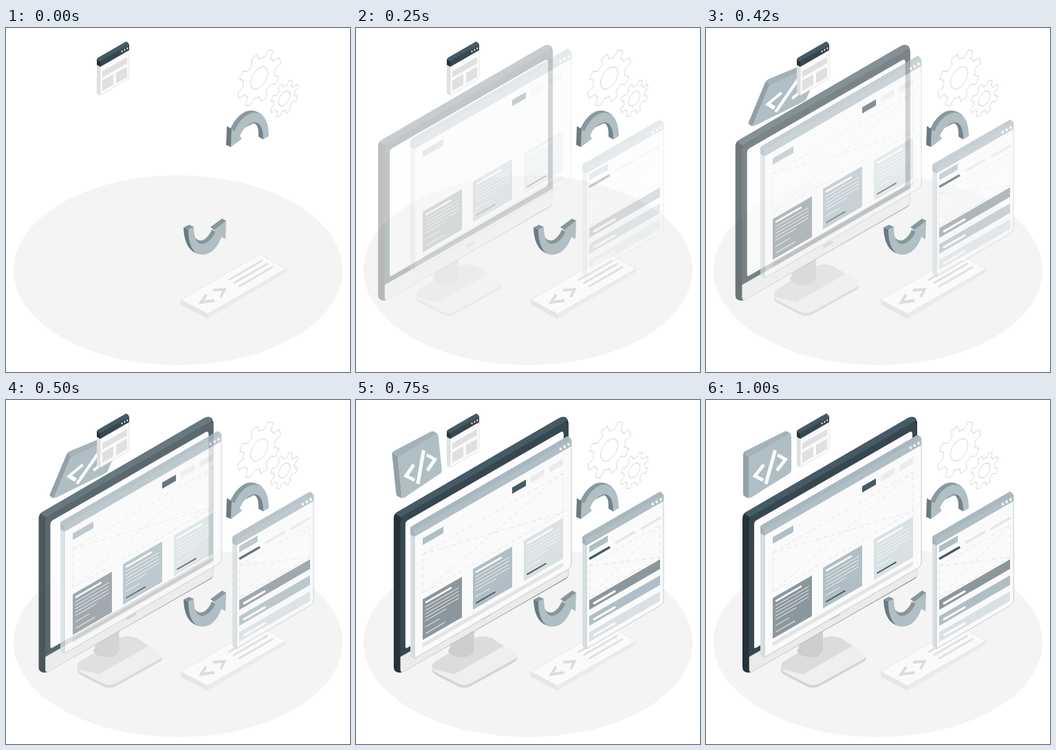
These frames come from a looping animation (500 px wide and 500 px high, 1.04 s). An HTML page:

```html
<!DOCTYPE html>
<html lang="en">
<head>
<meta charset="utf-8">
<title>Web design</title>
<style>
html, body { margin: 0; width: 100%; height: 100%; overflow: hidden; background: #fff; }
svg { display: block; width: 100vw; height: 100vh; }
</style>
</head>
<body>
<svg id="stage" viewBox="0 0 500 500"></svg>
<script>
const SLOPE = 0.577;
const path = (d, fill, extra = '') => `<path d="${d}" fill="${fill}" ${extra}/>`;
const line = (d, color, width, extra = '') =>
  path(d, 'none', `stroke="${color}" stroke-width="${width}" ${extra}`);
const group = (id, body) => `<g id="${id}">${body}</g>`;

// Parallelogram on the wall that rises to the right.
const quad = (x, y, w, h, fill) => path(`M${x} ${y}l${w} ${-w * SLOPE}v${h}l${-w} ${w * SLOPE}z`, fill);
const rise = (x, y, w, color, width, cap = 'round') =>
  line(`M${x} ${y}l${w} ${-w * SLOPE}`, color, width, `stroke-linecap="${cap}"`);

function placeholder(x, y, w, h) {
  const up = w * SLOPE;
  return line(`M${x} ${y}l${w} ${-up}v${h}l${-w} ${up}zl${w} ${h - up}M${x} ${y + h}l${w} ${-up - h}`,
    '#e0e0e0', 0.9, 'stroke-dasharray="6 5"');
}

// Browser window: (x, y) is the top left corner of its front.
function browser({ x, y, w, h, bar, depth, round, side, top, edge, front, outline, dotGap, dot }) {
  const up = w * SLOPE, dy = depth * SLOPE;
  let out = path(`M${x - depth} ${y - dy}L${x} ${y}v${h}l${-depth} ${-dy}z`, side);
  out += path(`M${x} ${y}l${w} ${-up}v${h - round}q0 ${round * 0.8} ${-round * 0.8} ${round * 1.3}L${x} ${y + h}z`,
    '#fafafa', `stroke="${outline}" stroke-width=".8"`);
  out += path(`M${x - depth} ${y - dy}L${x} ${y}v${bar}l${-depth} ${-dy}z`, edge);
  out += path(`M${x - depth} ${y - dy + 1}q0 -2 2 -3l${w - 2} ${-up + 1}q2 -1 ${depth} ${dy + 1}L${x} ${y + 1}z`, top);
  out += quad(x, y, w, bar, front);
  for (let i = 0; i < 3; i++) {
    const dx = w - dotGap * (i + 0.7);
    out += `<ellipse cx="${x + dx}" cy="${y - dx * SLOPE + bar / 2}" rx="${dot}" ry="${dot * 1.25}" fill="#fff"/>`;
  }
  return out;
}

function gear(cx, cy, outer, root, hole, phase) {
  const at = (r, deg) => {
    const a = deg * Math.PI / 180;
    return `${(r * Math.cos(a)).toFixed(2)} ${(r * Math.sin(a)).toFixed(2)}`;
  };
  let d = '';
  for (let i = 0; i < 8; i++) {
    const a = phase + i * 45;
    d += `${i ? `A${root} ${root} 0 0 1 ` : 'M'}${at(root, a - 13)}L${at(outer, a - 8)}` +
      `A${outer} ${outer} 0 0 1 ${at(outer, a + 8)}L${at(root, a + 13)}`;
  }
  return `<g transform="matrix(.866 -.5 0 1 ${cx} ${cy})" fill="#fff" stroke="#e0e0e0" stroke-width="1.4" stroke-linejoin="round">
    <path d="${d}A${root} ${root} 0 0 1 ${at(root, phase - 13)}z"/><circle r="${hole}"/></g>`;
}

function card(x, y, fill, accent) {
  let out = quad(x, y, 57, 59, fill) + rise(x + 5, y + 4, 36, '#fafafa', 2.6);
  [48, 48, 48, 48, 30].forEach((w, i) => { out += rise(x + 4, y + 11 + i * 5, w, '#fafafa', 0.9); });
  return out + rise(x + 4, y + 40, 20, '#fafafa', 0.9) + rise(x + 5, y + 49, 27, accent, 1.9);
}

const pale = { side: '#d7dfe2', top: '#a9b8bf', edge: '#a3b2b9', front: '#b0bec5', outline: '#b0bec5' };

const icon = browser({ x: 137, y: 48, w: 42, h: 50, bar: 8.5, depth: 5, round: 1, dotGap: 3.9, dot: 1,
    side: '#e0e0e0', top: '#455a64', edge: '#263238', front: '#37474f', outline: '#e0e0e0' }) +
  quad(140, 63, 36, 9, '#e0e0e0') + quad(140, 76.5, 16, 15, '#e0e0e0') + quad(160, 65.5, 16, 15, '#e0e0e0');

const keyboard =
  path('M254 395l39 20v8l-39-21z', '#e6e6e6') +
  path('M293 415l114-65v5l-114 68z', '#ebebeb') +
  path('M254 395L369 328.500 407 350 293 415.500z', '#fafafa', 'stroke="#e6e6e6" stroke-width=".9"') +
  line('M291 387.500L283.500 399 303 396M301 381L317.500 380 312 391', '#dcdcdc', 3.8) +
  rise(324, 366, 48, '#e0e0e0', 2.8) + rise(331.5, 370.500, 48, '#e0e0e0', 2.8) + rise(339, 375.500, 48, '#e0e0e0', 2.8);

const upperArrow =
  path('M325 148L330 139C337 127 347 119.500 357 120Q365 120.500 372 126L374 132 334 151z', '#8a999f') +
  path('M357 138C364 137 367 144 367 153v5l7 4v-14C372 140 366 135 357 138z', '#74838a') +
  path('M382 157L374 162C374 147 370 137 361 137 352 138 344 147 340 157L343 161 327 173 328 147 332 151C337 136 349 124 360 123 374 122 382 135 382 157z', '#b0bec5') +
  path('M321 142.500l7 4.500-1 26-7-3z', '#6b7a81');

const lowerArrow =
  path('M274 303C277 309 284 311 290 306Q296 301 299 293L305 296C302 306 293 316 285 316 279 315 275 309 274 303z', '#87969d') +
  path('M258 290l8 3 19 36C268 328 259 315 258 290z', '#6b7a81') +
  path('M265 293L273 289C273 305 277 314 285 314 294 313 301 304 304 297L302 293 320 280 319 307 313 303.500C308 318 299 329.500 285 329.500 272 329 265 315 265 293z', '#b0bec5') +
  path('M258 290l8-4 7 3-8 4z', '#87969d') +
  path('M297 289.500L314 277l6 3-17.500 13.500z', '#87969d');

const baseOutline = 'M109 387Q109 383 113 380L170 346Q180 341 196 346L230 368Q235 372 230 376L165 412Q157 416 148 413L113 395Q108 391 109 387z';
const monitor =
  `<g transform="translate(0 4)">${path(baseOutline, '#d4d4d4')}</g>` +
  path(baseOutline, '#efefef') +
  path('M109 387Q109 383 113 380L170 346Q180 341 196 346L213 357.500 141 398.500 110 391z', '#dcdcdc') +
  path('M137 345L170 328V363Q167 374 152 374 136 373 132 365 136 360 137 345z', '#cecece') +
  path('M53 172Q53 166 58 163L294 26Q305 21 307 33V252Q307 257 303 260L67 395Q60 398 55 394 53 392 53 388z', '#263238') +
  path('M55 165L58 163 294 26Q303 22.500 306 30L64 171z', '#455a64') +
  path('M62.500 178Q63 171 67 168L298 34Q307 30 307 39V240L62.500 380z', '#37474f') +
  path('M70 181Q70 177 73 175L295 47Q300 44 300 50V226Q300 229 297 231L73 360Q70 362 70 358z', '#fdfdfd') +
  path('M63 373.500L307 234V252Q307 257 303 259L67 395Q63 397 63 391z', '#ebebeb', 'stroke="#dadada" stroke-width=".7"') +
  rise(182, 317.500, 11, '#cfcfcf', 4);

const page = browser({ ...pale, x: 85, y: 187, w: 228, h: 187, bar: 10, depth: 6, round: 6, dotGap: 5.8, dot: 1.7 }) +
  quad(97, 199.500, 30, 9.5, '#b0bec5') + quad(227, 125.500, 20, 9, '#455a64') +
  quad(254, 110, 20, 9, '#ebebeb') + quad(281, 95, 20, 9, '#ebebeb') +
  placeholder(97, 222, 204, 57) +
  card(97, 288, '#8c979d', '#c2ccd1') + card(170, 244, '#b0bec5', '#455a64') + card(244, 202.500, '#d9e1e4', '#455a64') +
  quad(97, 352, 204, 6, '#e4e4e4');

const side = browser({ ...pale, x: 335, y: 202.500, w: 112, h: 159, bar: 9, depth: 6, round: 6, dotGap: 5.8, dot: 1.7 }) +
  quad(339, 212.500, 27, 9, '#b0bec5') +
  rise(377, 208, 29, '#e6e6e6', 3.4, 'butt') + rise(414, 187.500, 29, '#e6e6e6', 3.4, 'butt') +
  rise(339, 231, 30, '#455a64', 3.4, 'butt') +
  placeholder(339, 241, 103, 47) +
  ['#8c979d', '#b0bec5', '#d9e1e4'].map((fill, i) =>
    quad(339, 291 + i * 23.2, 103, 14, fill) + rise(346, 295.500 + i * 23.2, 30, '#fafafa', 3.2)).join('');

const tile =
  path('M54 79Q54 76 57 74.500L113 46.500Q116 45 118 46L123 49 62 84 62 143 56 140Q54 139 54 136z', '#92a1a8') +
  path('M55 77L57 74.500 113 46.500Q116 45 118 46L123.500 49 63 84z', '#a4b3ba') +
  path('M62 87Q62 83 65 81.500L119 50.500Q124 48 124 53V102Q124 105 121 107L66 141.500Q62 144 62 139z', '#b0bec5') +
  line('M84 94L71 110.500 83 116.500M104 79.500L115.500 86.500 103 102.500', '#fff', 4.8) +
  line('M100.500 73L87 122', '#fff', 5);

const stage = document.getElementById('stage');
stage.innerHTML = '<ellipse cx="250" cy="352" rx="239" ry="138" fill="#f4f4f4"/>' +
  gear(368, 72.500, 36, 27, 14.5, -13) + gear(404.5, 102.500, 23.5, 17.5, 9.7, -18) +
  group('monitor', monitor) + group('page', page) + keyboard + group('side', side) +
  upperArrow + lowerArrow + group('tile', tile) + icon;

// cubic-bezier(.36, -.01, .5, 1.38)
function ease(t) {
  if (t <= 0) return 0;
  if (t >= 1) return 1;
  const curve = (a, b, s) => 3 * (1 - s) ** 2 * s * a + 3 * (1 - s) * s * s * b + s ** 3;
  let lo = 0, hi = 1;
  for (let i = 0; i < 24; i++) {
    const mid = (lo + hi) / 2;
    if (curve(0.36, 0.5, mid) < t) lo = mid; else hi = mid;
  }
  return curve(-0.01, 1.38, lo);
}

const mix = (a, b, t) => a + (b - a) * t;
const LOOP = 1040, FPS = 24, TILE_MIDDLE = 94.5;

function pose(id, transform, opacity) {
  const el = document.getElementById(id);
  el.setAttribute('transform', transform);
  el.setAttribute('opacity', Math.max(0, Math.min(1, opacity)));
}

function render(ms) {
  const step = Math.min(24, Math.floor((ms % LOOP + 6) * FPS / 1000));
  const t = step < 2 ? 0 : Math.min(1, (step + 0.95) / FPS);
  const e = ease(t);
  pose('monitor', `translate(${-30 * (1 - e)} 0)`, e);
  pose('page', `translate(0 ${-30 * (1 - e)})`, e);
  pose('side', '', e);

  // The tile rushes in, leans back, then settles.
  const rush = ease(t / 0.6);
  const shift = -500 * (1 - rush);
  const skew = t < 0.6 ? mix(30, -20, rush)
    : t < 0.8 ? mix(-20, 5, ease((t - 0.6) / 0.2))
    : mix(5, 0, ease((t - 0.8) / 0.2));
  pose('tile', `translate(${shift} ${TILE_MIDDLE}) skewX(${skew}) translate(0 ${-TILE_MIDDLE})`, rush);
}

const start = performance.now();
function tick() {
  render(performance.now() - start);
  requestAnimationFrame(tick);
}
tick();
</script>
</body>
</html>
```
